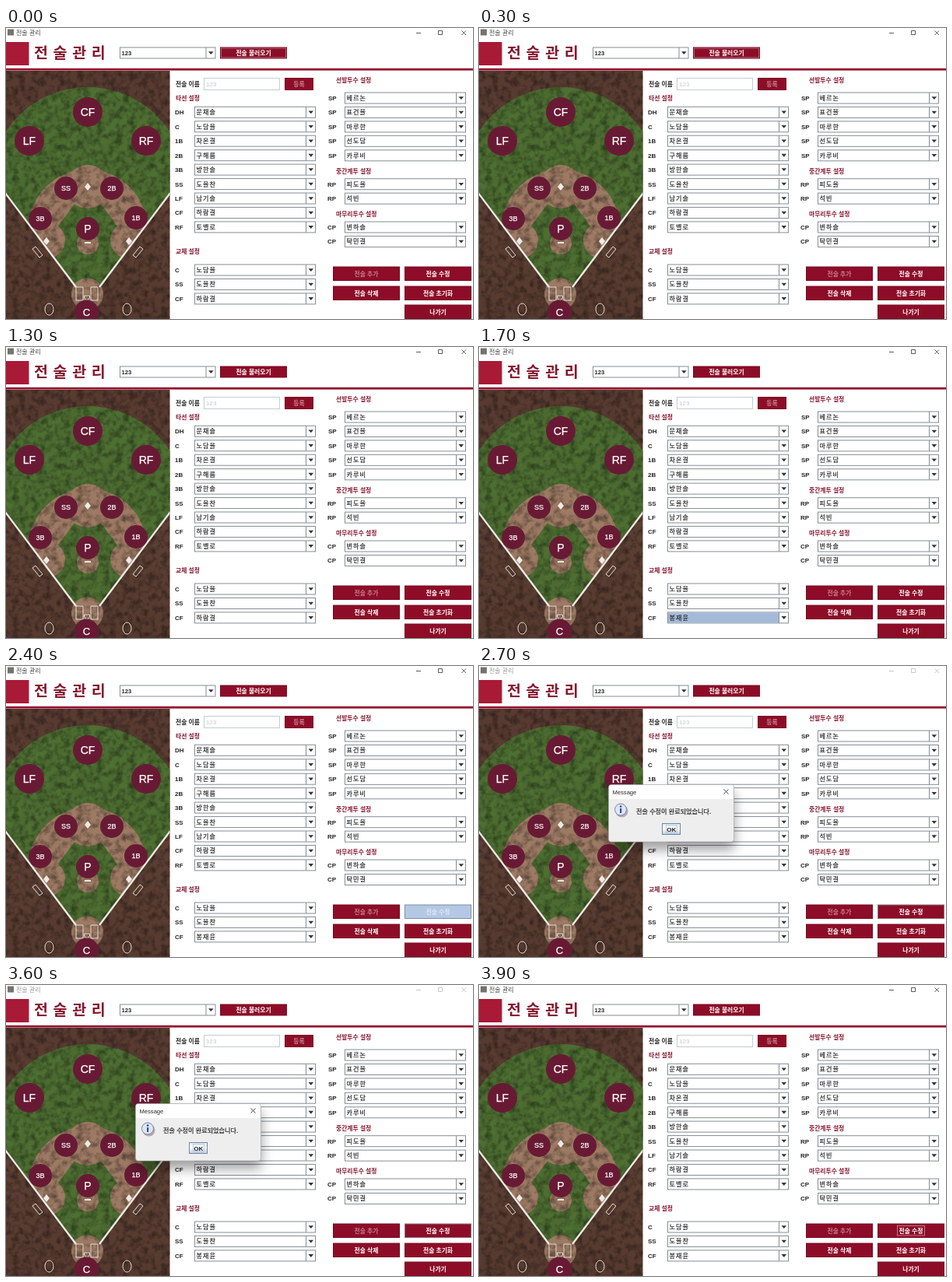
An HTML page that plays this animation: 600x374 px, repeating every 4000 ms.

```html
<!DOCTYPE html>
<html lang="ko">
<head>
<meta charset="utf-8">
<title>전술 관리</title>
<style>
html, body { margin: 0; width: 100%; height: 100%; overflow: hidden; background: #fff; }
svg { display: block; width: 600px; height: 374px; }
text { font-family: "Noto Sans CJK KR", "Noto Sans CJK", "Noto Sans CJK JP", sans-serif; }
.latin { font-family: "Liberation Sans", Arial, sans-serif; }
</style>
</head>
<body>
<svg id="stage" viewBox="0 0 600 374" xmlns="http://www.w3.org/2000/svg">
  <defs>
    <pattern id="grass" width="26" height="26" patternUnits="userSpaceOnUse" patternTransform="rotate(42)">
      <rect width="26" height="26" fill="#4b6b30"/>
      <rect width="13" height="26" fill="#4e6f32"/>
    </pattern>
    <linearGradient id="soil" x2="0" y2="1">
      <stop offset="0" stop-color="#573a30"/>
      <stop offset=".5" stop-color="#5d4034"/>
      <stop offset="1" stop-color="#563a2f"/>
    </linearGradient>
    <linearGradient id="metal" x2="0" y2="1">
      <stop offset="0" stop-color="#dce8f4"/>
      <stop offset=".45" stop-color="#fff"/>
      <stop offset="1" stop-color="#b8cfe5"/>
    </linearGradient>
    <filter id="grain" x="0" y="0" width="1" height="1">
      <feTurbulence type="fractalNoise" baseFrequency=".12" numOctaves="3" seed="4"/>
      <feColorMatrix values="0 0 0 0 0  0 0 0 0 0  0 0 0 0 0  .9 0 0 0 -.36"/>
    </filter>
    <filter id="blur" x="-.3" y="-.4" width="1.6" height="1.8"><feGaussianBlur stdDeviation="8"/></filter>
    <clipPath id="field"><rect y="55" width="210.5" height="319"/></clipPath>
    <clipPath id="fair"><path d="M-10 55H220V201L105 355L-10 201Z"/></clipPath>
  </defs>
  <rect width="600" height="374" fill="#fff"/>
  <g id="ui"></g>
</svg>
<script>
const NS = 'http://www.w3.org/2000/svg';
const RED = '#8d0d28', EDGE = '#7d0a22', HEAD = '#86182f', INK = '#262626';
const LINE = '#858d95', CLAY = '#9d7a63', CHALK = '#eee9e4', FOCUS = '#b08f98';
const LOOP = 4000;
let layer = document.getElementById('ui');

function add(tag, attrs, content) {
  const el = document.createElementNS(NS, tag);
  for (const key in attrs) el.setAttribute(key, attrs[key]);
  if (content !== undefined) el.textContent = content;
  layer.appendChild(el);
  return el;
}

function group(draw, attrs = {}) {
  const outer = layer;
  const g = add('g', attrs);
  layer = g;
  draw();
  layer = outer;
  return g;
}

const rect = (x, y, width, height, fill, more) => add('rect', { x, y, width, height, fill, ...more });
const path = (d, more) => add('path', { d, fill: 'none', ...more });
const circle = (cx, cy, r, fill) => add('circle', { cx, cy, r, fill });

// y is the vertical middle of the line
function label(x, y, str, more) {
  return add('text', { x, y: y + 3, 'font-size': 8.1, fill: INK, ...more }, str);
}
const bold = (x, y, str, fill = INK, more) =>
  label(x, y, str, { 'font-weight': 700, 'font-size': 7.8, fill, ...more });
const latin = (x, y, str, more) => label(x, y, str, { class: 'latin', ...more });
const medium = (x, y, str, more) => label(x, y, str, { stroke: INK, 'stroke-width': .2, ...more });

function combo(x, y, width, value) {
  rect(x + .5, y - 7, width - 1, 14, '#fff', { stroke: LINE });
  const mark = rect(x + 1, y - 6.5, width - 14, 13, '#a3bbd8', { visibility: 'hidden' });
  const right = x + width;
  path(`M${right - 12.5} ${y - 7}v14`, { stroke: LINE });
  path(`M${right - 9.5} ${y - 1.8}h6.6l-3.3 3.8z`, { fill: '#333' });
  const text = medium(x + 2.5, y, value, { 'letter-spacing': 1 });
  return { mark, text };
}

function button(x, y, width, height, str, fill = '#fff') {
  const box = rect(x + .5, y + .5, width - 1, height - 1, RED, { stroke: EDGE });
  const text = bold(x + width / 2, y + height / 2, str, fill, { 'text-anchor': 'middle' });
  return { box, text };
}

function rows(list, x, y0, labelX) {
  return list.map(([pos, name], i) => {
    const y = y0 + i * 18.45;
    latin(labelX, y, pos, { 'font-weight': 700, 'font-size': 8 });
    return combo(x, y, 156, name);
  });
}

function drawField() {
  rect(0, 55, 211, 319, 'url(#soil)');
  group(() => {
    circle(105, 202, 126, 'url(#grass)');
    circle(105, 258, 76, CLAY);
    path('M105 203L153 268L162 290L105 362L48 290L57 268Z', { fill: 'url(#grass)' });
    circle(53, 273, 23, CLAY);
    circle(157, 273, 23, CLAY);
    circle(105, 204, 28, CLAY);
  }, { 'clip-path': 'url(#fair)' });
  circle(105, 277, 14, CLAY);
  circle(104.5, 342, 20.5, CLAY);
  rect(0, 55, 211, 319, '#000', { filter: 'url(#grain)' });

  path('M-1 212L90 333M211 212L120 333', { stroke: CHALK, 'stroke-width': 2.3 });
  for (const [x, y] of [[105, 204], [52, 274], [158, 274]]) path(`M${x} ${y - 5}l4 5-4 5-4-5z`, { fill: CHALK });
  rect(101, 275, 8, 2, CHALK);
  const thin = { stroke: '#e8dfd8', 'stroke-width': 1 };
  path('M90 333h9v17h-9zM109 333h9v17h-9zM100.5 344h7v3l-3.5 3.5-3.5-3.5z', thin);
  path('M34 284l4-3 9 11-4 3zM176 284l-4-3-9 11 4 3z', thin);
  for (const cx of [55.5, 155.5]) add('ellipse', { cx, cy: 361.5, rx: 5.5, ry: 7.5, fill: 'none', ...thin });

  const spots = [
    ['CF', 105, 108, 19, 14], ['LF', 30, 145, 19, 14], ['RF', 180, 145, 19, 14],
    ['SS', 77, 206, 15, 9], ['2B', 136, 206, 15, 9],
    ['3B', 44, 245, 15, 9], ['1B', 167, 244, 15, 9],
    ['P', 105, 258, 15, 14], ['C', 103.5, 365, 15.5, 13]
  ];
  for (const [pos, x, y, r, size] of spots) {
    circle(x, y, r, '#681a34');
    add('text', {
      x, y: y + size * .36, 'font-size': size, fill: '#fff', stroke: '#fff', 'stroke-width': .25,
      class: 'latin', 'text-anchor': 'middle'
    }, pos);
  }
}

// Window frame and header
rect(2, 1.5, 8, 8, '#77726f');
const caption = label(13, 6, '전술 관리', { 'font-size': 8 });
const controls = path('M527 6.5h6M555.5 3.5h5v5h-5zM585.5 3.5l5.5 5.5m0-5.5l-5.5 5.5', { 'stroke-width': .8 });
rect(0, 18, 29.5, 30, '#a91a36');
add('text', { x: 36, y: 38.5, 'font-size': 19.5, 'font-weight': 700, 'letter-spacing': .6, fill: HEAD }, '전 술 관 리');
combo(146, 32, 123.5, '').text.remove();
latin(148.5, 32, '123', { 'font-weight': 700, 'font-size': 7.6 });
button(275, 24.5, 86, 15, '전술 불러오기');
const loadRing = rect(276.5, 26, 83, 12, 'none', { stroke: FOCUS, 'stroke-width': .7 });
rect(0, 51.8, 600, 2.8, '#95132e');

group(drawField, { 'clip-path': 'url(#field)' });

// Line-up form
bold(218, 72, '전술 이름');
rect(254.5, 64.5, 97, 15, '#fff', { stroke: '#c3ccd5' });
latin(257, 72, '123', { fill: '#c4cacf' });
button(358, 64, 37, 16, '등록', '#c98794');

const heads = [
  [218, 90, '타선 설정'], [218, 287, '교체 설정'], [424, 67.2, '선발투수 설정'],
  [424, 184.3, '중간계투 설정'], [424, 239.3, '마무리투수 설정']
];
for (const [x, y, str] of heads) bold(x, y, str, HEAD);

rows([['DH', '문채솔'], ['C', '노담율'], ['1B', '차온결'], ['2B', '구해름'], ['3B', '방한솔'],
  ['SS', '도율찬'], ['LF', '남기솔'], ['CF', '하람결'], ['RF', '토벨로']], 242, 108.3, 217);
const subs = rows([['C', '노담율'], ['SS', '도율찬'], ['CF', '하람결']], 242, 311, 217);
rows([['SP', '베르논'], ['SP', '표건율'], ['SP', '마루한'], ['SP', '선도담'], ['SP', '카루비']], 435, 90, 414);
rows([['RP', '피도율'], ['RP', '석빈']], 435, 200.7, 413);
rows([['CP', '변하솔'], ['CP', '탁민결']], 435, 256, 413);
const sub = subs[2];

button(420, 306.5, 86, 18.5, '전술 추가', '#c47b8a');
const edit = button(512, 306.5, 86, 18.5, '전술 수정');
button(420, 331.5, 86, 18.5, '전술 삭제');
button(512, 331.5, 86, 18.5, '전술 초기화');
button(512, 355.5, 86, 18.5, '나가기');
const editRing = rect(537.5, 309.5, 35, 12.5, 'none', { stroke: '#d9a3af', 'stroke-width': .7 });

const popup = group(() => {
  rect(241.5, 355.5, 156, 30, '#fff', { stroke: '#444' });
  rect(242, 356, 155, 11.5, '#b3c8e0');
  medium(244, 361.8, '선수를 선택하세요.');
  medium(244, 373, '봉재윤', { 'letter-spacing': 1 });
});

const dialog = group(() => {
  rect(168, 162, 160, 74, '#000', { opacity: .38, filter: 'url(#blur)' });
  rect(166.5, 152.5, 161, 73.5, '#eee', { stroke: '#a8a8a8', 'stroke-width': .7, rx: 3.5 });
  path('M167 171v-15q0-3 3-3h154q3 0 3 3v15z', { fill: '#fff' });
  latin(171.5, 161.5, 'Message', { 'font-size': 7.6 });
  path('M314.5 158.5l6 6m0-6l-6 6', { stroke: '#333', 'stroke-width': .9 });
  circle(183.5, 186.5, 8, '#b9a8ae');
  add('circle', { cx: 182, cy: 184.5, r: 7.5, fill: '#dce6f3', stroke: '#7686ae' });
  rect(181, 183, 2.2, 6, '#3c5190');
  circle(182.1, 180.6, 1.3, '#3c5190');
  medium(202, 187, '전술 수정이 완료되었습니다.');
  rect(235.5, 202.5, 23, 14, 'url(#metal)', { stroke: '#76879a' });
  rect(240.5, 204.5, 14, 10, 'none', { stroke: '#a9bdd6', 'stroke-width': .7 });
  latin(247.3, 209.5, 'OK', { 'font-weight': 700, 'text-anchor': 'middle' });
});

const show = (el, on) => el.setAttribute('visibility', on ? 'visible' : 'hidden');

function render(t) {
  const within = (a, b) => t >= a && t < b;
  const pressed = within(2300, 2600);
  const modal = within(2600, 3700);
  show(loadRing, t < 500);
  show(popup, within(500, 1200));
  show(sub.mark, within(1500, 2300));
  sub.text.textContent = t < 1500 ? '하람결' : '봉재윤';
  edit.box.setAttribute('fill', pressed ? '#b4c8e6' : RED);
  edit.box.setAttribute('stroke', pressed ? '#7f8fa8' : modal ? '#8c7279' : EDGE);
  edit.text.setAttribute('fill', pressed ? '#dfe6f0' : '#fff');
  show(editRing, t >= 3700);
  show(dialog, modal);
  caption.setAttribute('fill', modal ? '#999' : '#444');
  controls.setAttribute('stroke', modal ? '#bbb' : '#333');
}

const start = performance.now();
function tick() {
  render((performance.now() - start) % LOOP);
  requestAnimationFrame(tick);
}
tick();
</script>
</body>
</html>
```
